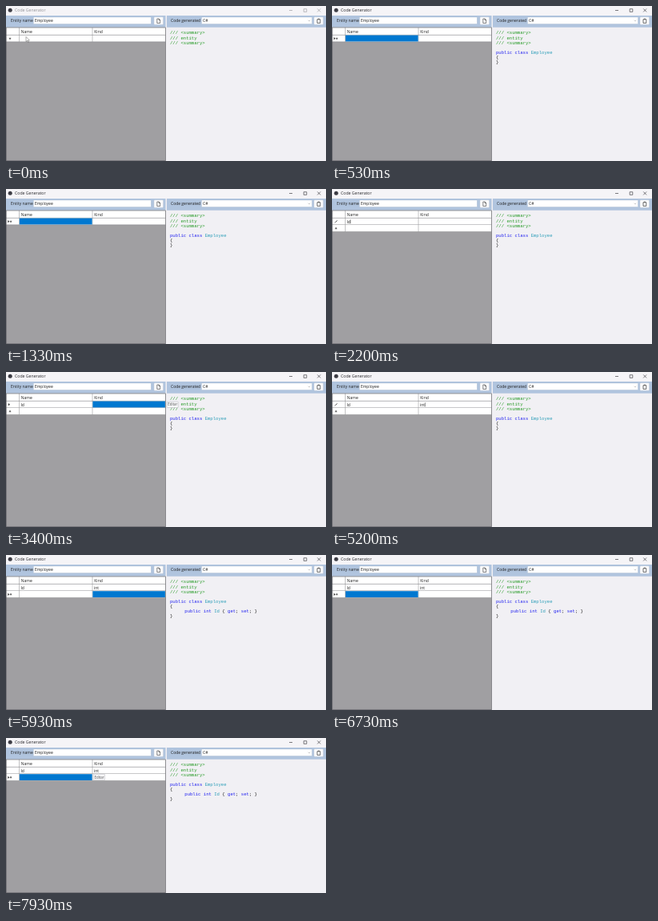
An HTML page for the animation above (8000 ms loop, 400 by 194 pixels).

```html
<!DOCTYPE html>
<html lang="en">
<head>
<meta charset="utf-8">
<title>Code Generator</title>
<style>
  html, body { margin: 0; width: 100%; height: 100%; overflow: hidden; background: #f1f0f4; }
  svg { display: block; width: 100vw; height: 100vh; }
  text { font: 5px "Open Sans", "Noto Sans", sans-serif; fill: #222; white-space: pre; }
  .code text { font: 5.6px "Liberation Mono", "Courier New", monospace; }
  .code .comment { fill: #259a25; }
  .key { fill: #2020f0; }
  .type { fill: #2b9db8; }
</style>
</head>
<body>
<svg id="stage" viewBox="0 0 400 194" preserveAspectRatio="none"></svg>
<script>
const LOOP = 8000;
const stage = document.getElementById('stage');
const SVG = 'http://www.w3.org/2000/svg';
const timed = [];

function add(parent, tag, attrs = {}, content) {
  const el = document.createElementNS(SVG, tag);
  for (const key in attrs) el.setAttribute(key, attrs[key]);
  if (content !== undefined) el.textContent = content;
  return parent.appendChild(el);
}
const rect = (p, x, y, width, height, fill, more) =>
  add(p, 'rect', { x, y, width, height, fill, ...more });
const path = (p, d, stroke, width = 0.6, fill = 'none') =>
  add(p, 'path', { d, stroke, 'stroke-width': width, fill });
const text = (p, x, y, value, more) => add(p, 'text', { x, y, ...more }, value);

// A group shown from start to end, with optional fades at both ends.
function during(start, end, fadeIn = 0, fadeOut = 0, parent = stage) {
  const el = add(parent, 'g');
  timed.push({ el, start, end, fadeIn, fadeOut });
  return el;
}

const T = {
  active: 200, pointerOff: 500,
  nameKey: 2000, nameKey2: 2130, nameDone: 2800,
  kindKey: 4270, kindKey2: 4530, kindKey3: 4800, kindDone: 5470,
  toName: 6330
};

// Window and toolbars
rect(stage, 0, 0, 400, 194, '#f1f0f4');
rect(stage, 0, 0, 400, 12, '#f5f4f7');
add(stage, 'circle', { cx: 5.2, cy: 5.2, r: 2.5, fill: '#3c3c44' });

function titleBar(group, color) {
  text(group, 11, 7.4, 'Code Generator', { style: `font-size:5.2px;fill:${color}` });
  path(group, 'M354 5.5h4M372.2 3.7h3.6v3.6h-3.6zM389.2 3.4l4 4m0-4l-4 4', color, 0.6);
}
titleBar(during(0, T.active), '#929297');
titleBar(during(T.active, LOOP), '#28282c');

function toolbar(x, width, label, labelX, fieldX, fieldW, value, buttonX) {
  rect(stage, x, 12, width, 14.7, '#b0c4de');
  text(stage, labelX, 20.4, label);
  rect(stage, fieldX, 14, fieldW, 8.5, '#fff', { stroke: '#a4b2c6', 'stroke-width': 0.3 });
  text(stage, fieldX + 1.6, 20.2, value);
  rect(stage, buttonX, 13.8, 11.5, 9.4, '#fcfcfd', { rx: 1, stroke: '#c5cbd4', 'stroke-width': 0.4 });
}
toolbar(0, 199.5, 'Entity name', 6, 34.3, 147, 'Employee', 185);
toolbar(201, 199, 'Code generated', 206, 244.5, 138, 'C#', 385);
path(stage, 'M188.8 16h2.4l1.4 1.4v4h-3.8zM191.1 16v1.5h1.5', '#333', 0.6);
path(stage, 'M389 16.7h3.8v4.6h-3.8zM390 16.2h1.8', '#333', 0.7);
path(stage, 'M377.7 17.8l1.3 1.2l1.3-1.2', '#777', 0.4);

// Code pane
const code = add(stage, 'g', { class: 'code' });
const CODE_X = 205;
const lineY = n => 35.4 + n * 6.1;

function codeLine(parent, n, spans, x = CODE_X) {
  const line = text(parent, x, lineY(n), '');
  for (const [value, name] of spans) add(line, 'tspan', name ? { class: name } : {}, value);
}
['<summary>', 'entity', '<summary>'].forEach((value, i) =>
  text(code, CODE_X, lineY(i), '/// ' + value, { class: 'comment' }));

const entity = during(T.active, LOOP, 0, 0, code);
codeLine(entity, 4, [['public class ', 'key'], ['Employee', 'type']]);
codeLine(entity, 5, [['{']]);
codeLine(during(T.active, T.kindDone, 0, 0, code), 6, [['}']]);

const property = during(T.kindDone, LOOP, 0, 0, code);
codeLine(property, 6, [['public int ', 'key'], ['Id', 'type'], [' { '],
  ['get', 'key'], ['; '], ['set', 'key'], ['; }']], 223.3);
codeLine(property, 7, [['}']]);

// Grid
const ROW_TOP = [36.4, 45];
const ROW_H = 8.4;
const NAME_X = 16.5, KIND_X = 108, GRID_R = 199.3;
const LINE = '#858588';
const BLUE = '#0078d0';

rect(stage, 0, 26.8, 199.6, 167.2, '#a09fa2');
rect(stage, 0, 27, GRID_R, 9.4, '#fff');
text(stage, 18.8, 33.8, 'Name');
text(stage, 110.3, 33.8, 'Kind');

function row(group, i) {
  const y = ROW_TOP[i];
  rect(group, 0, y, GRID_R, ROW_H, '#fff');
  path(group, `M0 ${y + ROW_H}H${GRID_R}M${NAME_X} ${y}v${ROW_H}M${KIND_X} ${y}v${ROW_H}`, LINE, 0.5);
}
row(stage, 0);
row(during(T.nameKey, LOOP), 1);
path(stage, `M0 36.3H${GRID_R}M${NAME_X} 27v9.4M${KIND_X} 27v9.4`, LINE, 0.5);
rect(stage, 0.3, 27, 199.2, 166.7, 'none', { stroke: '#626266', 'stroke-width': 0.6 });

function select(start, end, column, i) {
  const x = column ? KIND_X : NAME_X;
  const right = column ? GRID_R : KIND_X;
  rect(during(start, end), x + 0.4, ROW_TOP[i] + 0.2, right - x - 0.8, ROW_H - 0.6, BLUE);
}
select(T.active, T.nameKey, 0, 0);
select(T.nameDone, T.kindKey, 1, 0);
select(T.kindDone, T.toName, 1, 1);
select(T.toName, LOOP, 0, 1);

// Row header marks
const MARKS = {
  star: (g, x, y) => path(g, `M${x - 1.3} ${y}h2.6M${x - 0.7} ${y - 1.1}l1.4 2.2m0-2.2l-1.4 2.2`, '#222', 0.5),
  arrow: (g, x, y) => path(g, `M${x - 1} ${y - 1.6}l1.8 1.6l-1.8 1.6z`, 'none', 0, '#222'),
  pencil: (g, x, y) => {
    path(g, `M${x - 0.8} ${y + 0.9}l2.3-2.2`, '#333', 0.9);
    path(g, `M${x - 2.2} ${y + 1.3}h0.8`, '#333', 0.6);
  }
};
function mark(start, end, i, kinds) {
  const group = during(start, end);
  kinds.forEach(([kind, x]) => MARKS[kind](group, x, ROW_TOP[i] + 4.3));
}
const arrowStar = [['arrow', 3.4], ['star', 6]];
mark(0, T.active, 0, [['star', 5]]);
mark(T.active, T.nameKey, 0, arrowStar);
mark(T.nameKey, T.nameDone, 0, [['pencil', 5]]);
mark(T.nameKey, T.kindDone, 1, [['star', 5]]);
mark(T.nameDone, T.kindKey, 0, [['arrow', 4]]);
mark(T.kindKey, T.kindDone, 0, [['pencil', 5]]);
mark(T.kindDone, LOOP, 1, arrowStar);

// Cell typing
function cell(start, end, column, value, caretX) {
  const group = during(start, end);
  const x = (column ? KIND_X : NAME_X) + 1.9;
  text(group, x, 42.7, value);
  if (caretX) path(group, `M${x + caretX} 38.2v5.2`, '#222', 0.5);
}
cell(T.nameKey, T.nameKey2, 0, 'I', 1.7);
cell(T.nameKey2, T.nameDone, 0, 'Id', 4.6);
cell(T.nameDone, LOOP, 0, 'Id');
cell(T.kindKey, T.kindKey2, 1, 'i', 1.6);
cell(T.kindKey2, T.kindKey3, 1, 'in', 4.7);
cell(T.kindKey3, T.kindDone, 1, 'int', 6.5);
cell(T.kindDone, LOOP, 1, 'int');

// Tooltips and pointer
function tooltip(x, y, ...times) {
  const group = during(...times);
  rect(group, x, y, 14.3, 7.4, '#f8f8fa', { rx: 0.6, stroke: '#b5b5ba', 'stroke-width': 0.5 });
  text(group, x + 1.3, y + 5.2, 'Editar', { style: 'font-size:4.4px;fill:#555' });
}
tooltip(201, 37.2, 3200, 4440, 130, 180);
tooltip(109.2, 45.3, 6800, LOOP, 130);

path(during(0, T.pointerOff), 'M25 38.4v6.2l1.5-1.3l1 2.2l0.9-0.4l-1-2.1h2z', '#333', 0.4, '#fff');

const clamp = v => Math.max(0, Math.min(1, v));
const origin = performance.now();
function draw(now) {
  const t = Math.max(0, now - origin) % LOOP;
  for (const { el, start, end, fadeIn, fadeOut } of timed) {
    const on = t >= start && t < end;
    const rise = fadeIn ? clamp((t - start) / fadeIn) : 1;
    const fall = fadeOut ? clamp((end - t) / fadeOut) : 1;
    el.style.display = on ? '' : 'none';
    el.style.opacity = Math.min(rise, fall);
  }
  requestAnimationFrame(draw);
}
draw(origin);
</script>
</body>
</html>
```
